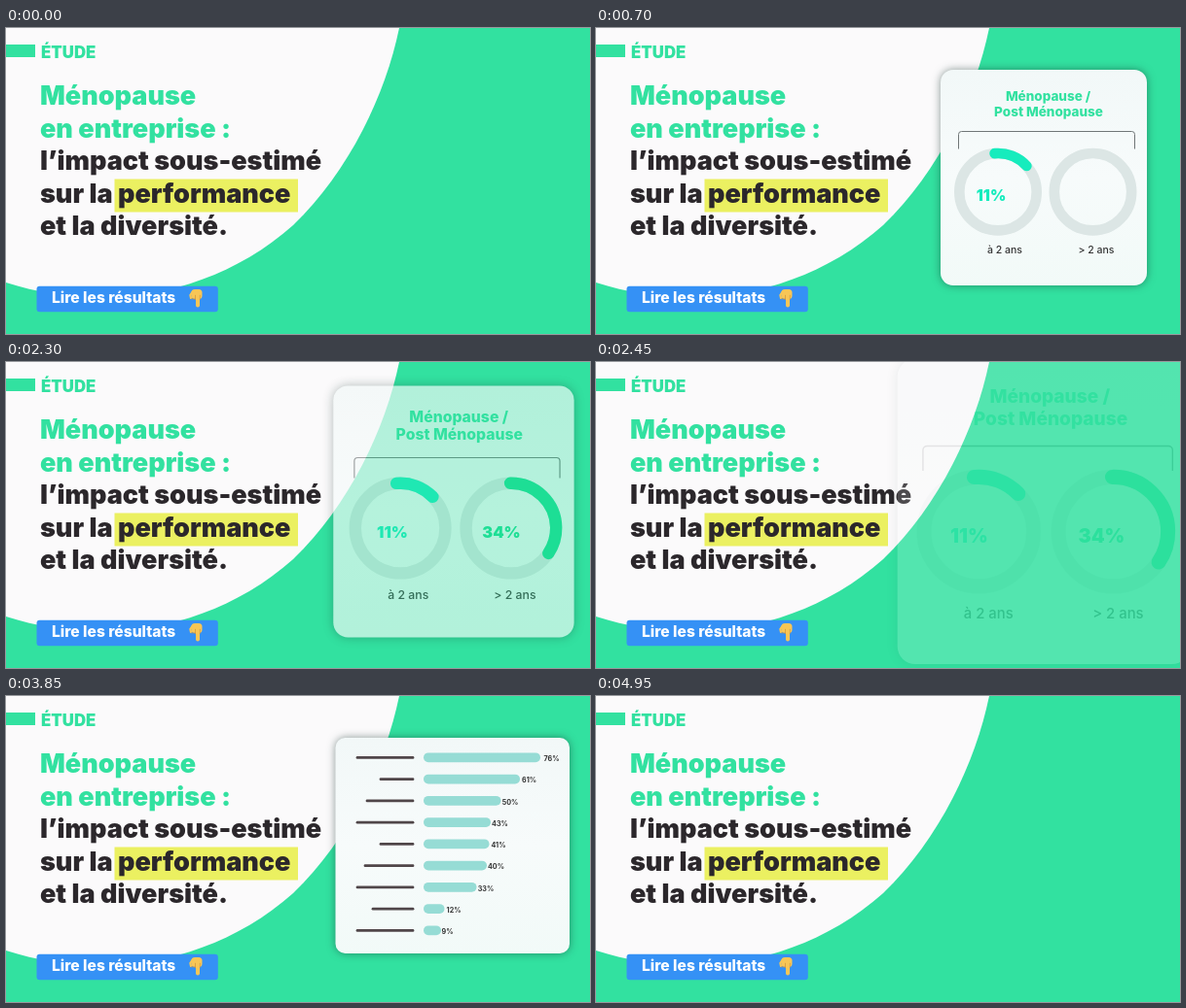
Recreate the animation shown at these times as an HTML page with a canvas. Size 600 by 315 pixels, loop 5 s.

```html
<!DOCTYPE html>
<html lang="fr">
<head>
<meta charset="utf-8">
<title>Étude</title>
<style>
  html, body { margin: 0; width: 100%; height: 100%; overflow: hidden; background: #32e1a0; }
  canvas { display: block; width: 600px; height: 315px; }
</style>
</head>
<body>
<canvas id="stage" width="600" height="315"></canvas>
<script>
const W = 600, H = 315, LOOP = 5000, STEP = 50;
const GREEN = '#32e1a0', INK = '#2b272b';
const stage = document.getElementById('stage').getContext('2d');
const layer = document.createElement('canvas');
layer.width = W;
layer.height = H;
const card = layer.getContext('2d');

const progress = (t, start, end) => Math.min(1, Math.max(0, (t - start) / (end - start)));
const spring = (p, damping, speed) =>
  p <= 0 ? 0 : p >= 1 ? 1 : 1 - Math.exp(-damping * p) * Math.cos(speed * p);

function text(c, str, x, y, size, weight, color, align = 'left') {
  c.font = `${weight} ${size}px Inter, sans-serif`;
  c.fillStyle = color;
  c.textAlign = align;
  c.fillText(str, x, y);
}

function box(c, x, y, w, h, r, color) {
  c.fillStyle = color;
  c.beginPath();
  c.roundRect(x, y, w, h, r);
  c.fill();
}

function line(c, points, width, color) {
  c.strokeStyle = color;
  c.lineWidth = width;
  c.lineCap = 'round';
  c.beginPath();
  points.forEach(([x, y]) => c.lineTo(x, y));
  c.stroke();
}

function arc(c, x, y, from, to, color) {
  const rad = deg => (deg - 90) * Math.PI / 180;
  c.strokeStyle = color;
  c.lineWidth = 10.6;
  c.lineCap = 'round';
  c.beginPath();
  c.arc(x, y, 39.7, rad(from), rad(to));
  c.stroke();
}

function scaleAbout(c, x, y, s) {
  c.translate(x, y);
  c.scale(s, s);
  c.translate(-x, -y);
}

function popText(c, str, x, y, size, weight, color, s) {
  if (s <= 0) return;
  c.save();
  scaleAbout(c, x, y - size * 0.36, s);
  text(c, str, x, y, size, weight, color, 'center');
  c.restore();
}

function hand() {
  const skin = '#f8c656', shade = '#cf9440';
  box(stage, 190.5, 269, 11, 10, 3.5, skin);
  box(stage, 195, 272, 4, 15.5, 2, skin);
  line(stage, [[192, 271], [189.4, 275], [190, 278]], 2.2, skin);
  for (const x of [194.5, 199.3]) line(stage, [[x, 275], [x, 279.5]], 0.7, shade);
  line(stage, [[190.5, 278.8], [194.5, 279]], 0.7, shade);
}

function backdrop() {
  stage.fillStyle = GREEN;
  stage.fillRect(0, 0, W, H);
  stage.fillStyle = '#fbfafb';
  stage.beginPath();
  stage.moveTo(0, 0);
  stage.lineTo(404, 0);
  stage.bezierCurveTo(390, 68, 353, 147, 295, 203);
  stage.bezierCurveTo(213, 276, 100, 294, 0, 262);
  stage.fill();

  box(stage, 0, 17, 30, 13, 0, GREEN);
  text(stage, 'ÉTUDE', 36, 30.5, 16.8, 900, GREEN);
  box(stage, 111.5, 155.5, 188.5, 34, 0, '#ebf061');
  const title = (str, x, row, color) => text(stage, str, x, 79 + row * 33.6, 27, 900, color);
  title('Ménopause', 35, 0, GREEN);
  title('en entreprise :', 35, 1, GREEN);
  title('l’impact sous-estimé', 35, 2, INK);
  title('sur la', 35, 3, INK);
  title('performance', 115, 3, INK);
  title('et la diversité.', 35, 4, INK);

  box(stage, 31.5, 265.8, 186.3, 26.4, 3, '#3591f5');
  text(stage, 'Lire les résultats', 47, 283.3, 15.6, 800, '#fff');
  hand();
}

function panel(x, y, w, h, r, scale) {
  card.save();
  card.shadowColor = 'rgba(20, 50, 45, 0.5)';
  card.shadowBlur = 9 * scale;
  const tint = card.createLinearGradient(0, y, 0, y + h);
  tint.addColorStop(0, '#f2f8f8');
  tint.addColorStop(0.5, '#f7fbfb');
  tint.addColorStop(1, '#f2faf8');
  box(card, x, y, w, h, r, tint);
  card.restore();
}

// Pops in with a spring, then zooms and fades out over 300 ms.
function showCard(t, { start, damping, leave, x, y, draw }) {
  const out = progress(t, leave, leave + 300);
  const scale = spring(progress(t, start, start + 550), damping, 8.6) * (1 + out / 2);
  if (scale <= 0 || out >= 1) return;
  card.clearRect(0, 0, W, H);
  card.save();
  scaleAbout(card, x, y, scale);
  draw(t, scale);
  card.restore();
  stage.globalAlpha = 1 - out;
  stage.drawImage(layer, 0, 0);
  stage.globalAlpha = 1;
}

const gauges = [
  { x: 413, from: -5, to: 46, color: '#16ecbd', label: '11%', labelX: 406, note: 'à 2 ans', noteX: 420, start: 600, drawn: 900, settled: 900 },
  { x: 510.5, from: -1, to: 124, color: '#13de90', label: '34%', labelX: 502, note: '> 2 ans', noteX: 514, start: 1050, drawn: 1600, settled: 1650 }
];

function drawGauges(t, scale) {
  panel(354, 43, 212, 222, 13, scale);
  text(card, 'Ménopause /', 464.5, 75, 13.5, 800, GREEN, 'center');
  text(card, 'Post Ménopause', 465, 91, 13.5, 800, GREEN, 'center');
  card.strokeStyle = '#707677';
  card.lineWidth = 1;
  card.beginPath();
  card.moveTo(372.5, 124.5);
  card.arcTo(372.5, 106.5, 380, 106.5, 3);
  card.arcTo(553.5, 106.5, 553.5, 124, 3);
  card.lineTo(553.5, 124.5);
  card.stroke();

  for (const g of gauges) {
    arc(card, g.x, 168.7, 0, 360, '#dce6e5');
    const turn = spring(progress(t, g.start, g.drawn), 3, 5);
    if (turn > 0) arc(card, g.x, 168.7, g.from, g.from + (g.to - g.from) * turn, g.color);
    const pop = spring(progress(t, g.start, g.settled), 3.8, 6);
    popText(card, g.label, g.labelX, 177, 14, 900, g.color, pop);
    text(card, g.note, g.noteX, 231.5, 10.5, 500, '#353535', 'center');
  }
}

// [line start, bar end, percentage]
const rows = [
  [361, 549, 76], [385, 528, 61], [371, 508.5, 50],
  [361, 498, 43], [385, 496.5, 41], [369, 494, 40],
  [361, 483.5, 33], [377, 450.5, 12], [361, 447, 9]
];

function drawBars(t, scale) {
  panel(338.5, 43, 240.5, 222, 10, scale);
  const pop = spring(progress(t, 2800, 3150), 5, 8);
  rows.forEach(([left, end, percent], i) => {
    const y = 63.4 + i * 22.25;
    line(card, [[left, y], [418, y]], 2.8, '#504649');
    const start = 3150 + i * 30;
    const grow = spring(progress(t, start, start + 450), 7, 7);
    if (grow > 0) box(card, 429, y - 5, (end - 429) * grow, 9.8, 4.9, '#96dcd5');
    const labelX = end + (percent < 10 ? 6.5 : percent > 70 ? 11.5 : 9.5);
    popText(card, percent + '%', labelX, y + 3.8, 7.2, 700, '#333', pop);
  });
}

const cards = [
  { start: 50, damping: 7, leave: 2200, x: 460.3, y: 154.5, draw: drawGauges },
  { start: 2600, damping: 5.3, leave: 4650, x: 458.6, y: 154, draw: drawBars }
];

function frame() {
  const t = Math.floor(performance.now() % LOOP / STEP) * STEP;
  backdrop();
  cards.forEach(c => showCard(t, c));
  requestAnimationFrame(frame);
}
frame();
</script>
</body>
</html>
```
